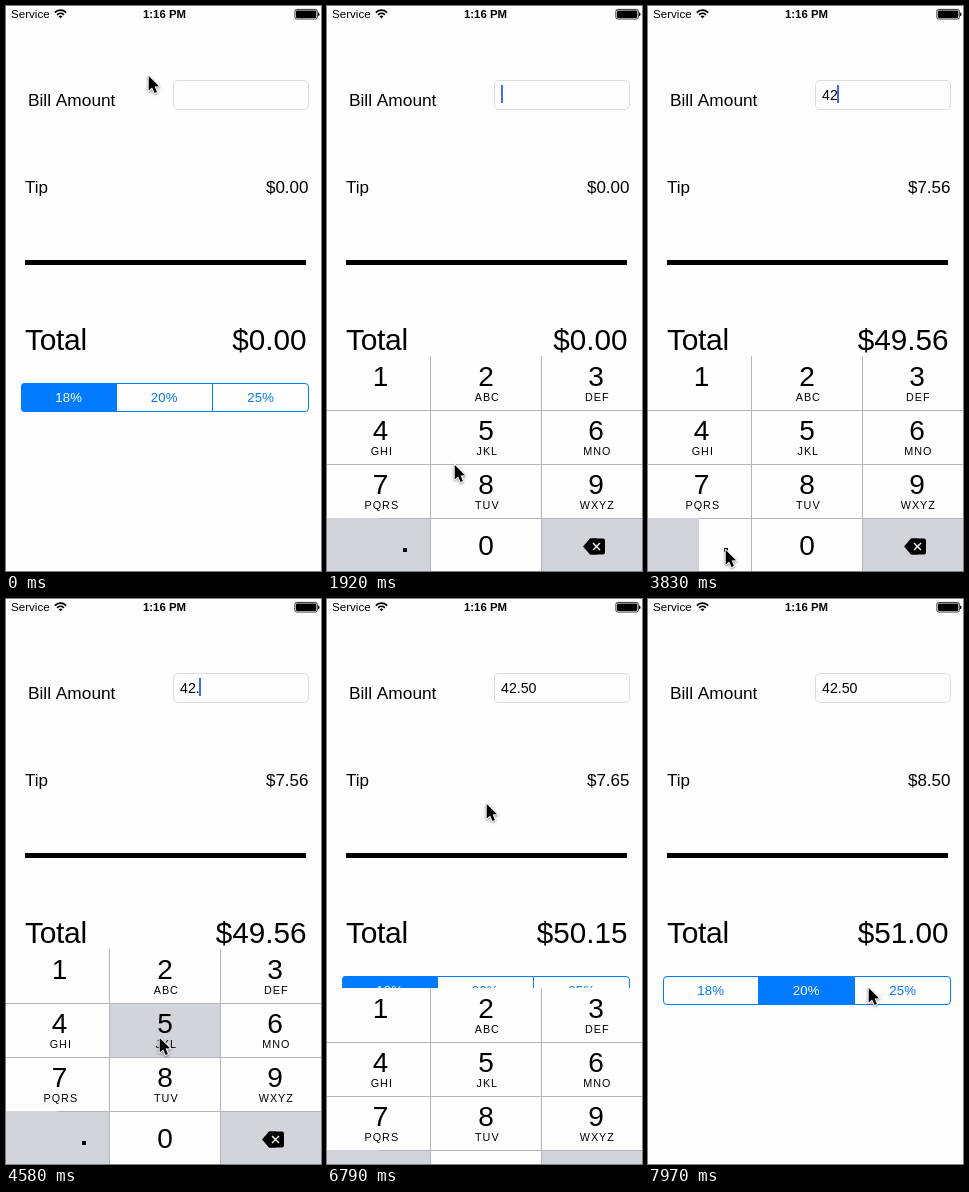
These frames come from a looping animation (315 px wide and 565 px high, 8000 ms). An HTML page with a canvas:

```html
<!DOCTYPE html>
<html lang="en">
<head>
<meta charset="utf-8">
<title>Tip calculator</title>
<style>
html, body { margin: 0; width: 100%; height: 100%; overflow: hidden; background: #fefefe; }
canvas { display: block; }
</style>
</head>
<body>
<canvas id="stage" width="315" height="565"></canvas>
<script>
const ctx = document.getElementById('stage').getContext('2d');
const FONT = '"Liberation Sans", Arial, sans-serif';
const PAPER = '#fefefe', BLUE = '#007aff', GREY = '#d1d5db', RULE = '#b3b4b7';
const LOOP = 8000, TICK = 147.6;

// Stops of the pointer: arrival tick, departure tick, x, y.
// Between two stops it glides with a soft start and end.
const STOPS = [
  [0, 0, 142, 69], [2, 4, 170, 79], [5, 6, 172, 80], [8, 9, 176, 83],
  [13, 13, 127, 458], [16, 18, 56, 434], [19, 20, 170, 368], [21, 21, 188, 360],
  [23, 23, 160, 384], [26, 27, 77, 543], [28, 28, 115, 515], [31, 32, 153, 438],
  [34, 35, 163, 538], [38, 38, 203, 513], [44, 47, 159, 204], [51, 52, 158, 391],
  [54, 54, 220, 388]
];

// A key is held from one tick to another; its character appears on release.
const PRESSES = [
  ['4', 16, 18], ['2', 22, 23], ['.', 26, 28], ['5', 31, 32], ['0', 34, 36]
];
const CARET_ON = 10, CARET_OFF = 45, CARET_BLINKS = [15, 16, 41, 42];
const LETTERS = ['', 'ABC', 'DEF', 'GHI', 'JKL', 'MNO', 'PQRS', 'TUV', 'WXYZ'];
const COLUMNS = [[0, 103, 53.5], [104, 214, 159], [215, 315, 269]];

const clamp = v => Math.max(0, Math.min(1, v));
const easeOut = u => 1 - (1 - clamp(u)) ** 3;
const easeInOut = u => u * u * (3 - 2 * u);

function rect(x, y, w, h, color) {
  ctx.fillStyle = color;
  ctx.fillRect(x, y, w, h);
}

function text(str, x, y, size, { align = 'left', color = '#000', weight = '', spacing = 0 } = {}) {
  ctx.font = `${weight} ${size}px ${FONT}`;
  ctx.textAlign = align;
  ctx.letterSpacing = spacing + 'px';
  ctx.fillStyle = color;
  ctx.fillText(str, x, y);
  return ctx.measureText(str).width;
}

function roundPath(x, y, w, h, r) {
  ctx.beginPath();
  ctx.roundRect(x, y, w, h, r);
}

function polygon(points) {
  ctx.beginPath();
  points.forEach(([x, y]) => ctx.lineTo(x, y));
  ctx.closePath();
}

function pointerAt(tick) {
  const i = STOPS.findIndex(stop => stop[1] >= tick);
  const [arrive, , x, y] = STOPS[i];
  if (tick >= arrive) return [x, y];
  const [, leave, x0, y0] = STOPS[i - 1];
  const u = easeInOut((tick - leave) / (arrive - leave));
  return [x0 + (x - x0) * u, y0 + (y - y0) * u];
}

function drawStatusBar() {
  text('Service', 5, 12, 11.6);
  text('1:16 PM', 158.5, 12, 11.4, { align: 'center', weight: 'bold' });
  ctx.strokeStyle = '#000';
  ctx.lineWidth = 1.7;
  for (const r of [4.6, 7.8]) {
    ctx.beginPath();
    ctx.arc(54.5, 12, r, -Math.PI * 0.76, -Math.PI * 0.24);
    ctx.stroke();
  }
  ctx.fillStyle = '#000';
  ctx.beginPath();
  ctx.moveTo(54.5, 12.3);
  ctx.arc(54.5, 12.3, 2.7, -Math.PI * 0.76, -Math.PI * 0.24);
  ctx.fill();

  ctx.lineWidth = 0.8;
  roundPath(288.9, 3.4, 22.4, 9.6, 1.8);
  ctx.stroke();
  roundPath(290, 4.5, 20.2, 7.4, 0.8);
  ctx.fill();
  roundPath(312, 6.5, 1.5, 3.4, [0, 1.5, 1.5, 0]);
  ctx.fill();
}

function drawField(amount, caret) {
  text('Bill Amount', 22, 99.5, 17.3);
  ctx.strokeStyle = '#dcdcdc';
  ctx.lineWidth = 1;
  roundPath(167.5, 74.5, 135, 29, 4.5);
  ctx.stroke();
  const width = text(amount, 174, 94, 14.2);
  if (caret) rect(Math.round(174 + width - 0.3), 79, 2, 18, '#426bf2');
}

function drawTotals(amount, rate) {
  const bill = Number(amount) || 0;
  const tip = bill * rate;
  text('Tip', 19, 187, 17);
  text('$' + tip.toFixed(2), 302.5, 187, 17, { align: 'right' });
  rect(19, 254, 281, 5, '#000');
  text('Total', 19, 344, 30, { spacing: -0.3 });
  text('$' + (bill + tip).toFixed(2), 300.5, 344, 29.7, { align: 'right' });
}

function drawSegments(selected, touched) {
  const edges = [15, 110, 206, 303];
  ctx.save();
  roundPath(15, 377, 288, 29, 4);
  ctx.clip();
  ['18%', '20%', '25%'].forEach((label, i) => {
    const x = edges[i], w = edges[i + 1] - x + (i < 2 ? 1 : 0);
    if (i === selected) rect(x, 377, w, 29, BLUE);
    else if (i === touched) rect(x, 377, w, 29, '#d9ebff');
    text(label, (edges[i] + edges[i + 1]) / 2 + 0.3, 396, 13.2,
      { align: 'center', color: i === selected ? '#fff' : BLUE, spacing: 0.2 });
  });
  rect(110, 377, 1, 29, BLUE);
  rect(206, 377, 1, 29, BLUE);
  ctx.restore();
  ctx.strokeStyle = BLUE;
  ctx.lineWidth = 1;
  roundPath(15.5, 377.5, 287, 28, 3.5);
  ctx.stroke();
}

function drawDigit(digit, column, y, letters, held) {
  const [left, right, center] = COLUMNS[column];
  if (held === digit) rect(left, y, right - left, 54, GREY);
  text(digit, center, y + (digit === '0' ? 37 : 30), 28, { align: 'center' });
  text(letters, center + 1.3, y + 45, 10.8, { align: 'center', spacing: 1 });
}

function drawBackspace() {
  ctx.fillStyle = '#000';
  polygon([[256, 190.5], [263, 182.5], [270, 182.5], [270, 198.5], [263, 198.5]]);
  ctx.fill();
  roundPath(262, 182.5, 16, 16, 2);
  ctx.fill();
  ctx.strokeStyle = '#fff';
  ctx.lineWidth = 1.4;
  ctx.beginPath();
  ctx.moveTo(266, 187); ctx.lineTo(273, 194);
  ctx.moveTo(273, 187); ctx.lineTo(266, 194);
  ctx.stroke();
}

function drawKeyboard(offset, held) {
  if (offset >= 215) return;
  ctx.save();
  ctx.translate(0, 350 + offset);
  rect(0, 0, 315, 215, PAPER);
  LETTERS.forEach((letters, i) =>
    drawDigit(String(i + 1), i % 3, Math.floor(i / 3) * 54, letters, held));
  rect(0, 162, 103, 53, GREY);
  rect(214, 162, 101, 53, GREY);
  if (held === '.') rect(51, 163, 52, 52, PAPER);
  drawDigit('0', 1, 162, '', held);
  rect(76, 192, 4, 4, '#000');
  drawBackspace();
  rect(0, 54, 315, 1, RULE);
  rect(0, 108, 315, 1, RULE);
  rect(51, 162, 264, 1, RULE);
  rect(103, 0, 1, 215, RULE);
  rect(214, 0, 1, 215, RULE);
  ctx.restore();
}

function drawPointer([x, y]) {
  ctx.save();
  ctx.translate(x + 0.7, y + 0.9);
  polygon([[0, 0], [0, 14.6], [3.4, 11.5], [5.8, 17], [8.2, 16], [5.9, 10.6], [10.4, 10.4]]);
  ctx.lineJoin = 'round';
  ctx.strokeStyle = '#fff';
  ctx.lineWidth = 2;
  ctx.shadowColor = 'rgba(0,0,0,.45)';
  ctx.shadowBlur = 2.5;
  ctx.shadowOffsetY = 1;
  ctx.stroke();
  ctx.shadowColor = 'transparent';
  ctx.fillStyle = '#000';
  ctx.fill();
  ctx.restore();
}

function draw(ms) {
  // Everything advances in even ticks, so the motion is stepped.
  const tick = Math.min(54, Math.floor((ms + 8) / TICK));
  const time = tick * TICK;
  const amount = PRESSES.filter(p => tick >= p[2]).map(p => p[0]).join('');
  const press = PRESSES.find(p => tick >= p[1] && tick < p[2]);
  const selected = tick >= 53 ? 1 : 0;
  const caret = tick >= CARET_ON && tick < CARET_OFF && !CARET_BLINKS.includes(tick);
  const shown = easeOut((time - 1400) / 400) - easeOut((time - 6764) / 400);

  rect(0, 0, 315, 565, PAPER);
  drawStatusBar();
  drawField(amount, caret);
  drawTotals(amount, selected ? 0.2 : 0.18);
  drawSegments(selected, tick === 52 ? 1 : -1);
  drawKeyboard(Math.round(215 * (1 - shown)), press && press[0]);
  drawPointer(pointerAt(tick));
}

const start = performance.now();
function loop() {
  draw((performance.now() - start) % LOOP);
  requestAnimationFrame(loop);
}
loop();
</script>
</body>
</html>
```
